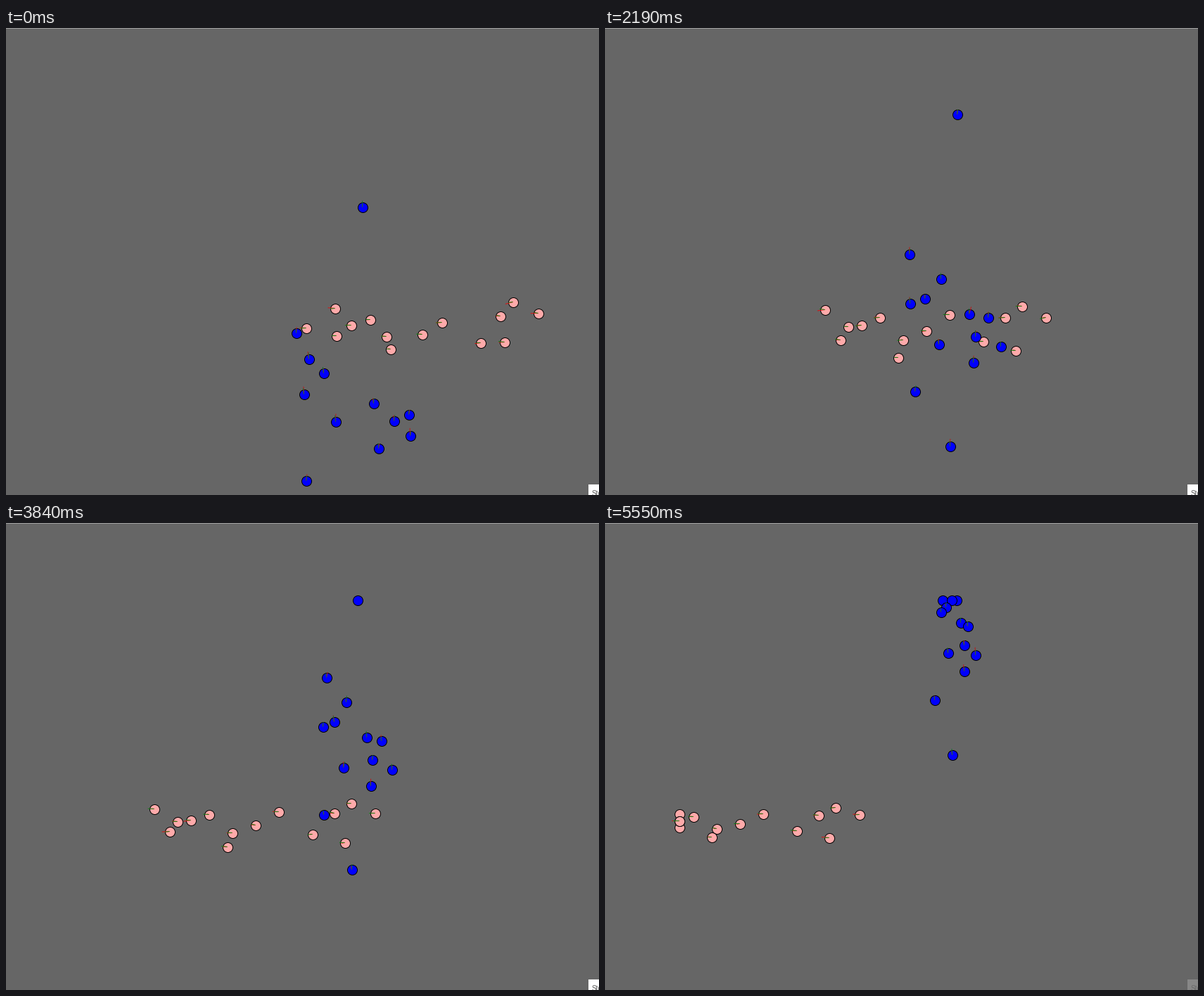
A matplotlib script that plays this animation: 843 px wide and 664 px high, repeating every 5620 ms.

```python
import numpy as np
import matplotlib.pyplot as plt
from matplotlib.animation import FuncAnimation
from matplotlib.collections import LineCollection
from matplotlib.patches import Rectangle

W, H, DPI = 843, 664, 64
LOOP, TICK = 5620, 20
FRAMES = LOOP // TICK
PX = 72 / DPI  # points per pixel

UPDATES = 73  # screen updates per loop
MEET, RUSH, STOP = 17, 63, 71  # updates where the pace changes
CRUISE, SPRINT = 4.63, 12.9  # pixels per update

# Each walker: where it starts and where it leaves the crossing crowd
PINK = [
    (427, 427, 364, 398), (470, 438, 386, 447), (468, 399, 397, 425),
    (491, 423, 416, 423), (518, 415, 442, 411), (541, 439, 475, 446),
    (547, 457, 468, 473), (592, 436, 508, 432), (620, 419, 541, 407),
    (675, 448, 589, 447), (709, 447, 635, 461), (703, 410, 620, 411),
    (721, 390, 644, 394), (757, 406, 678, 411),
]
BLUE = [
    (507, 255, 503, 174), (413, 434, 422, 373), (431, 471, 475, 408),
    (452, 491, 449, 436), (424, 521, 426, 443), (523, 534, 520, 458),
    (573, 550, 551, 463), (552, 559, 530, 490), (469, 560, 472, 501),
    (575, 580, 570, 504), (530, 598, 527, 527), (427, 644, 436, 568),
    (492, 724, 490, 646),
]


def walk(rows, axis, goal, pull):
    """Positions at every update: cross the crowd, head for the goal, wait."""
    rows = np.array(rows, float)
    start, meet = rows[:, :2], rows[:, 2:]
    aim = meet + pull * (np.array(goal) - meet)
    aim[:, axis] = goal[axis]

    step = np.arange(STOP + 1)
    early = np.clip(step / MEET, 0, 1)
    way = (CRUISE * np.clip(step - MEET, 0, RUSH - MEET)
           + SPRINT * np.clip(step - RUSH, 0, None))
    late = np.clip(way / (meet - aim)[:, axis, None], 0, 1)
    return (start[:, None] + (meet - start)[:, None] * early[:, None]
            + (aim - meet)[:, None] * late[..., None])


fig = plt.figure(figsize=(W / DPI, H / DPI), dpi=DPI, facecolor="#666666")
ax = fig.add_axes([0, 0, 1, 1])
ax.set_xlim(0, W)
ax.set_ylim(H, 0)
ax.axis("off")
ax.add_patch(Rectangle((0, 0), W, 1, fc="#a0a0a0", lw=0))

tip = ax.add_patch(Rectangle((828, 649), 15, 15, fc="white", lw=0))
label = ax.text(832.5, 665, "Stop", family="Liberation Sans", size=10 * PX,
                va="baseline", clip_on=True)


class Crowd:
    def __init__(self, path, heading, color, red, green, z):
        self.path, self.heading = path, heading
        self.discs = ax.scatter([], [], s=(14 * PX) ** 2, c=color,
                                edgecolors="black", linewidths=PX, zorder=z)
        self.red, self.green = (
            ax.add_collection(LineCollection([], colors=c, linewidths=PX,
                                             zorder=z + 1))
            for c in (red, green))

    def show(self, step, rng):
        now = max(step, 1)
        speed = np.linalg.norm(self.path[:, now] - self.path[:, now - 1],
                               axis=1)
        base = np.round(self.path[:, step]) - 0.5
        self.discs.set_offsets(base)
        # Trembling needles: red push, green velocity
        for line, low, high in (self.red, 3, 11), (self.green, 5, 9):
            angle = self.heading + rng.normal(0, 0.12, len(base))
            size = rng.uniform(low, high, len(base)) * (speed > 0.5)
            tip_x, tip_y = size * np.cos(angle), size * np.sin(angle)
            ends = base + np.column_stack([tip_x, tip_y])
            line.set_segments(np.stack([base, ends], axis=1))


crowds = [
    Crowd(walk(PINK, 0, (106, 424), 0.6), np.pi,
          "#ffaaaa", "#e01010", "#108010", 3),
    Crowd(walk(BLUE, 1, (499, 110), 0.75), -np.pi / 2,
          "#0000ff", "#c01818", "#107030", 5),
]


def draw(i):
    count = min(int(i * UPDATES / FRAMES + 0.35), UPDATES - 1)
    step = min(count, STOP)
    rng = np.random.default_rng(step)
    for crowd in crowds:
        crowd.show(step, rng)

    # The corner button dims at the end
    fade = max(count - STOP + 1, 0) / 2
    tip.set_facecolor(str(1 - 0.47 * fade))
    label.set_color(str(0.37 + 0.05 * fade))
    return []


anim = FuncAnimation(fig, draw, frames=FRAMES, interval=TICK,
                     repeat=True, repeat_delay=0)
plt.show()
```
